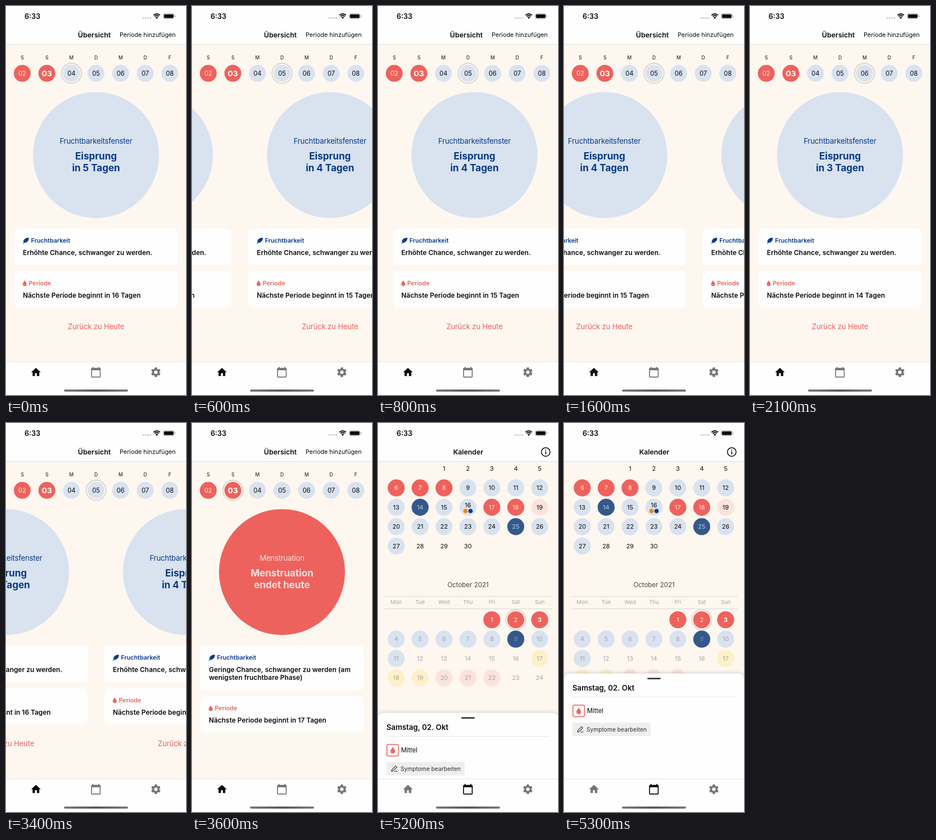
An HTML page with a canvas that plays this animation: 320x692 px, repeating every 8000 ms.

```html
<!DOCTYPE html>
<html lang="de">
<head>
<meta charset="utf-8">
<title>Zykluskalender</title>
<style>
html, body { margin: 0; width: 100%; height: 100%; overflow: hidden; background: #fefefe; }
canvas { display: block; width: 320px; height: 692px; }
</style>
</head>
<body>
<canvas id="stage"></canvas>
<script>
const W = 320, H = 692, LOOP = 8000, STEP = 100;
const C = {
  cream: '#fdf7f0', white: '#fefefe', black: '#0b0b0b', red: '#ee625d', navy: '#063a8a',
  blue: '#d9e2ef', deep: '#35588c', pink: '#fbe3dc', yellow: '#fdf0c9', grey: '#757575',
  faint: '#a9a5a1', ring: '#dcd5cb', line: '#ddd8d2', blush: '#fae3df', orange: '#f5820b'
};

const canvas = document.getElementById('stage');
const ctx = canvas.getContext('2d');
const dpr = window.devicePixelRatio || 1;
canvas.width = W * dpr;
canvas.height = H * dpr;

function text(str, x, y, size, color, { weight = 400, align = 'left', track = 0 } = {}) {
  ctx.font = `${weight} ${size}px Inter, Roboto, sans-serif`;
  ctx.letterSpacing = `${track * size}px`;
  ctx.textAlign = align;
  ctx.fillStyle = color;
  ctx.fillText(str, x, y);
}

function mid(str, x, y, size, color, weight = 400, track = 0) {
  text(str, x, y, size, color, { weight, track, align: 'center' });
}

function rect(x, y, w, h, color) {
  ctx.fillStyle = color;
  ctx.fillRect(x, y, w, h);
}

function round(x, y, w, h, r, color) {
  ctx.beginPath();
  ctx.roundRect(x, y, w, h, r);
  ctx.fillStyle = color;
  ctx.fill();
}

function disc(x, y, r, color) {
  ctx.beginPath();
  ctx.arc(x, y, r, 0, 7);
  ctx.fillStyle = color;
  ctx.fill();
}

function circle(x, y, r, width, color) {
  ctx.beginPath();
  ctx.arc(x, y, r, 0, 7);
  ctx.lineWidth = width;
  ctx.strokeStyle = color;
  ctx.stroke();
}

// Runs draw() with the origin moved and scaled
function at(x, y, scale, draw) {
  ctx.save();
  ctx.translate(x, y);
  ctx.scale(scale, scale);
  draw();
  ctx.restore();
}

function fillPath(d, color) {
  ctx.fillStyle = color;
  ctx.fill(new Path2D(d), 'evenodd');
}

function strokePath(d, width, color) {
  ctx.lineWidth = width;
  ctx.strokeStyle = color;
  ctx.stroke(new Path2D(d));
}

// ---- icons ----

function feather(x, y) {
  at(x, y, 1, () => {
    fillPath('M10.6 .3C7.6 0 4.6 1.1 2.7 3 1.2 4.5.8 6.3 1.1 8.6L5.6 4.6 2.2 9.2C4.4 9.6 6.3 9 7.8 7.6L6.6 7.2 9 6.3C10.3 4.5 11 2.2 10.6 .3Z', C.navy);
    strokePath('M.4 10.7L4.8 5.6', 1.1, C.navy);
  });
}

function drop(x, y, scale = 1) {
  at(x, y, scale, () => {
    fillPath('M3.6 0C4.2 2.4 7.1 4.3 7.1 7A3.5 3.4 0 0 1 .1 7C.1 4.3 3 2.4 3.6 0Z', C.red);
    strokePath('M1.6 7.2A2 2 0 0 0 3.5 8.9', .7, '#f9c4c0');
  });
}

// Tab icons share a 24-unit grid centred on the origin
const tabIcon = (x, draw) => at(x, 651.5, .853, draw);

function house(color) {
  tabIcon(53.2, () => fillPath('M-2 8V2H2V8H7V0H10L0-9-10 0H-7V8Z', color));
}

function calendarIcon(color) {
  tabIcon(159.8, () => fillPath(
    'M8-9H7V-11H5V-9H-5V-11H-7V-9H-8A2 2 0 0 0-10-7V9A2 2 0 0 0-8 11H8A2 2 0 0 0 10 9V-7A2 2 0 0 0 8-9ZM8 9H-8V-4H8Z', color));
}

function gear(color) {
  tabIcon(266.4, () => {
    ctx.beginPath();
    for (let i = 0; i < 6; i++) {
      const a = i * Math.PI / 3 - Math.PI / 2;
      for (const [da, r] of [[-.377, 7.55], [-.23, 10.1], [.23, 10.1], [.377, 7.55]]) {
        ctx.lineTo(Math.cos(a + da) * r, Math.sin(a + da) * r);
      }
    }
    ctx.closePath();
    ctx.moveTo(3.6, 0);
    ctx.arc(0, 0, 3.6, 0, 7);
    ctx.fillStyle = color;
    ctx.fill('evenodd');
  });
}

// ---- frame around both screens ----

function statusBar() {
  rect(0, 0, W, 68, C.white);
  mid('6:33', 47, 22.6, 12.6, C.black, 600);
  for (let i = 0; i < 4; i++) disc(244 + i * 4.2, 21.3, 1.5, '#cbcbcb');

  ctx.lineCap = 'butt';
  for (const r of [8.2, 5.2]) {
    ctx.beginPath();
    ctx.arc(268, 22.2, r, -Math.PI * .75, -Math.PI * .25);
    ctx.lineWidth = 1.9;
    ctx.strokeStyle = C.black;
    ctx.stroke();
  }
  fillPath('M268 22.8L265.7 20.4A3.3 3.3 0 0 1 270.3 20.4Z', C.black);

  ctx.beginPath();
  ctx.roundRect(279.4, 13.4, 19.8, 9.4, 2.8);
  ctx.lineWidth = .8;
  ctx.strokeStyle = '#a5a5a5';
  ctx.stroke();
  round(280.7, 14.7, 17.2, 6.8, 1.7, C.black);
  round(300, 16.6, 1.2, 3, .6, '#a5a5a5');
}

function tabBar(onCalendar) {
  rect(0, 633, W, H - 633, C.white);
  rect(0, 632.5, W, 1, '#e9e5e0');
  house(onCalendar ? C.grey : C.black);
  calendarIcon(onCalendar ? C.black : C.grey);
  gear(C.grey);
  const g = ctx.createLinearGradient(103, 0, 217, 0);
  g.addColorStop(0, '#777');
  g.addColorStop(.5, '#555');
  g.addColorStop(1, '#777');
  round(103, 682.3, 114, 3.6, 1.8, g);
}

// ---- overview ----

const fertile = (days, next) => ({
  fill: C.blue, ink: C.navy, small: 'Fruchtbarkeitsfenster',
  big: ['Eisprung', `in ${days} Tagen`],
  chance: ['Erhöhte Chance, schwanger zu werden.'], next, link: true
});

const pages = [
  {
    fill: C.red, ink: C.blush, small: 'Menstruation',
    big: ['Menstruation', 'endet heute'],
    chance: ['Geringe Chance, schwanger zu werden (am', 'wenigsten fruchtbare Phase)'], next: 17
  },
  fertile(5, 16), fertile(4, 15), fertile(3, 14)
];

function card(y, h, label, ink, labelX, lines) {
  round(15, y, 290, h, 6.5, C.white);
  text(label, labelX, y + 25.2, 10.7, ink, { weight: 600 });
  lines.forEach((line, i) =>
    text(line, 30, y + 47 + i * 14.3, 11.85, C.black, { weight: 600, track: .003 }));
}

function drawPage(page, linkAlpha) {
  disc(160, 265.2, 112, page.fill);
  mid(page.small, 160, 245, 13.2, page.ink, 400, -.015);
  page.big.forEach((line, i) => mid(line, 160, 273 + i * 21, 17.1, page.ink, 700, -.003));

  const extra = (page.chance.length - 1) * 14.3;
  card(396, 64.8 + extra, 'Fruchtbarkeit', C.navy, 44.5, page.chance);
  feather(30, 412);
  card(471.8 + extra, 64.6, 'Periode', C.red, 40.5, [`Nächste Periode beginnt in ${page.next} Tagen`]);
  drop(29.6, 487.8 + extra);

  if (page.link) {
    ctx.globalAlpha = linkAlpha;
    mid('Zurück zu Heute', 160, 575.3, 13.2, C.red, 400, -.015);
    ctx.globalAlpha = 1;
  }
}

function weekStrip(selected) {
  [...'SSMDMDF'].forEach((day, i) => {
    const x = 28.9 + i * 43.72, y = 119.8;
    const today = i === 1;
    mid(day, x, 95.2, 8.5, C.black);
    if (i === selected) circle(x, y, 17.8, 1.9, C.ring);
    disc(x, y, 15, i < 2 ? C.red : C.blue);
    mid(`0${i + 2}`, x, y + (today ? 4.9 : 4), today ? 13.8 : 11.2,
      i < 2 ? (today ? C.white : C.blush) : C.black, today ? 700 : 400);
  });
}

function swipe(t, start) {
  if (t < start) return 0;
  if (t >= start + 500) return 1;
  return 1 - .724 * Math.exp(-(t - start) / 100);
}

function pagePosition(t) {
  const u = Math.min(1, Math.max(0, (t - 3200) / 400));
  const back = u * u * (3 - 2 * u);
  return (1 + swipe(t, 500) + swipe(t, 1600)) * (1 - back);
}

function overview(t) {
  const pos = pagePosition(t);
  const linkAlpha = t >= 3100 && t < 3300 ? .52 : 1;
  rect(0, 68, W, 566, C.cream);
  pages.forEach((page, i) => {
    const x = (i - pos) * W;
    if (Math.abs(x) < W) at(x, 0, 1, () => drawPage(page, linkAlpha));
  });
  weekStrip(Math.round(pos) + 1);
  statusBar();
  mid('Übersicht', 157, 56.2, 12.4, C.black, 600);
  text('Periode hinzufügen', 202, 55.4, 10.8, C.black);
}

// ---- calendar ----

const tones = { r: C.red, b: C.blue, n: C.deep, p: C.pink, y: C.yellow };

// One letter per day gives its tone; '.' stays plain
function month(days, column, top, ink) {
  [...days].forEach((tone, i) => {
    const n = i + 1, cell = i + column;
    const x = 32.4 + cell % 7 * 42.5, y = top + Math.floor(cell / 7) * 34.45;
    if (tones[tone]) disc(x, y, 15.1, tones[tone]);
    ink(n, x, y, tone);
  });
}

function septemberDay(n, x, y, tone) {
  const color = tone === 'r' ? C.blush : tone === 'n' ? '#b9c8de' : C.black;
  const marked = n === 16;
  mid(n, x, y + (marked ? .2 : 4), 10.9, color);
  if (marked) {
    disc(x - 4.3, y + 6.7, 3.8, C.orange);
    disc(x + 4.6, y + 6.7, 3.8, C.navy);
  }
}

function octoberDay(n, x, y, tone) {
  if (n === 2) circle(x, y, 17.6, 1.8, C.ring);
  const color = n === 3 ? C.white : tone === 'r' ? C.blush : tone === 'n' ? '#7b8798' : C.faint;
  mid(n, x, y + 4, 10.9, color, n === 3 ? 700 : 400);
}

function sheet(dy) {
  ctx.save();
  ctx.translate(0, dy);
  ctx.shadowColor = 'rgba(0,0,0,.22)';
  ctx.shadowBlur = 7 * dpr;
  round(0, 445.5, W, 260, [9, 9, 0, 0], C.white);
  ctx.shadowColor = 'transparent';
  round(148, 453.2, 24, 2.8, 1.4, '#3d3d3d');
  text('Samstag, 02. Okt', 15, 476, 13.2, C.black, { weight: 600 });
  rect(15, 487, 289, 1, '#ebe8e5');

  ctx.beginPath();
  ctx.roundRect(15.8, 501.8, 20.6, 20.6, 3);
  ctx.lineWidth = 1.5;
  ctx.strokeStyle = C.red;
  ctx.stroke();
  drop(22, 506, 1.15);
  text('Mittel', 41, 516.3, 11.1, C.black);

  round(15, 533, 139, 24, 2, '#efeeed');
  ctx.lineJoin = 'round';
  strokePath('M24 549.6L24.7 546.6 31.2 540.1 33.4 542.3 26.9 548.8ZM29 549.8H34.5', 1.1, '#333');
  text('Symptome bearbeiten', 40, 548.8, 10.25, '#303030');
  ctx.restore();
}

function calendar(t) {
  rect(0, 68, W, 566, C.cream);
  month('.....rrrbbbbbnbbrrpbbbbbnbb...', 2, 81, septemberDay);
  mid('October 2021', 160, 292.3, 11.5, '#444');
  rect(12, 308, 297, 1, C.line);
  rect(12, 330, 297, 1, C.line);
  ['Mon', 'Tue', 'Wed', 'Thu', 'Fri', 'Sat', 'Sun'].forEach((day, i) =>
    mid(day, 32.4 + i * 42.5, 322.4, 9.6, C.faint));
  month('rrrbbbbbnbb.....yyyppp..', 4, 350, octoberDay);

  sheet(t < 5300 ? 70 : 0);
  statusBar();
  mid('Kalender', 160.4, 56.2, 12.3, C.black, 600);
  circle(298.2, 51.6, 7.7, 1.5, C.black);
  rect(297.4, 50.6, 1.7, 5, C.black);
  rect(297.4, 47.4, 1.7, 1.8, C.black);
}

function frame(now) {
  const t = Math.floor(now % LOOP / STEP) * STEP;
  const onCalendar = t >= 5200;
  ctx.setTransform(dpr, 0, 0, dpr, 0, 0);
  rect(0, 0, W, H, C.white);
  (onCalendar ? calendar : overview)(t);
  rect(0, 67.7, W, .9, '#dcd9d6');
  tabBar(onCalendar);
  requestAnimationFrame(frame);
}

requestAnimationFrame(frame);
</script>
</body>
</html>
```
